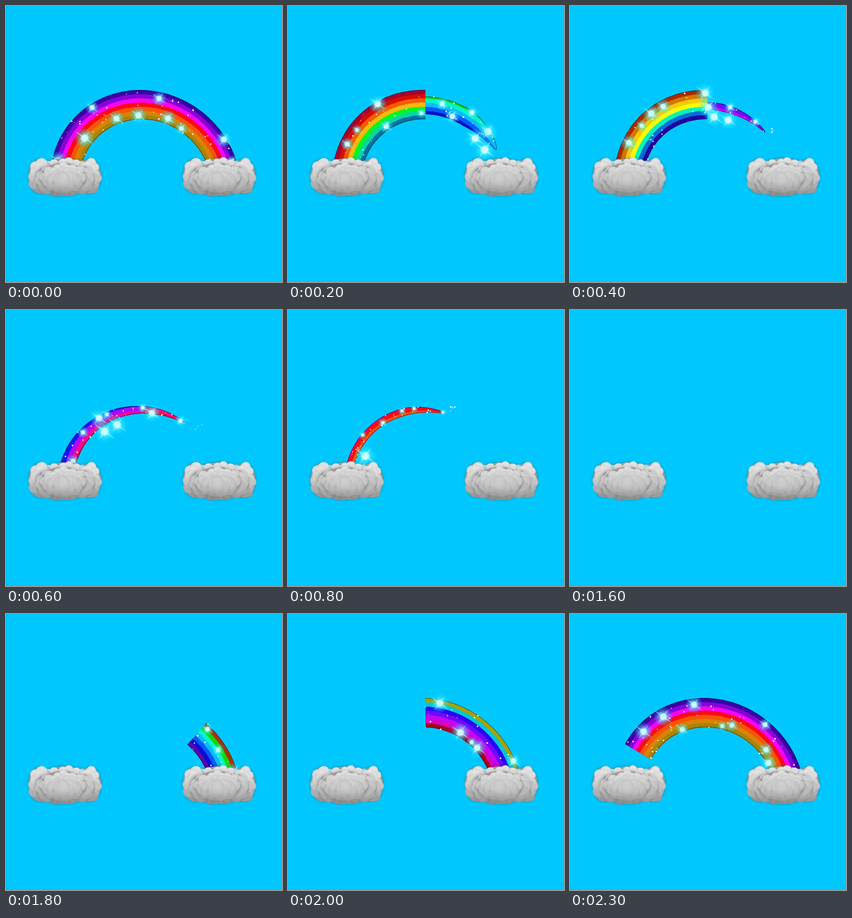
Write an HTML page with a canvas that moves like this. It is 480x480 px and loops after 2.4 s.

```html
<!DOCTYPE html>
<html lang="en">
<head>
<meta charset="utf-8">
<title>Rainbow</title>
<style>
html, body { margin: 0; width: 100%; height: 100%; overflow: hidden; background: #00c8ff; }
canvas { display: block; width: 480px; height: 480px; }
</style>
</head>
<body>
<canvas id="stage" width="480" height="480"></canvas>
<script>
const ctx = document.getElementById('stage').getContext('2d');
const STEP = 100, STEPS = 24, TAU = Math.PI * 2;
const CX = 240, CY = 312, OUTER = 166, FULL = 51, THIN = 13;
const SPLIT = 239, HORIZON = 264, LEAN = 0.06;
const lerp = (a, b, k) => a + (b - a) * k;
const clamp = v => Math.max(0, Math.min(1, v));

function seeded(seed) {
  let s = seed * 7919 + 17;
  return () => {
    s = (s + 0x6D2B79F5) | 0;
    let v = Math.imul(s ^ (s >>> 15), 1 | s);
    v = (v + Math.imul(v ^ (v >>> 7), 61 | v)) ^ v;
    return ((v ^ (v >>> 14)) >>> 0) / 4294967296;
  };
}

// Hues of the stripes from the outside in; both halves cycle from WARM through their own set
const WARM = [260, 277, 300, 357, 380, 396, 408];
const LEFT = [375, 392, 410, 420, 525, 570, 612];
const RIGHT = [420, 545, 610, 625, 648, 668, 712];

function stripe(hues, i, n) {
  const u = clamp((n % 4) / 3), k = u * u * (3 - 2 * u);
  const hue = n % 8 < 4 ? lerp(WARM[i], hues[i], k) : lerp(hues[i], WARM[i] + 360, k);
  const edge = (i - 3) / 3;
  return `hsl(${hue % 360},96%,${51 - 18 * edge * edge}%)`;
}

// The visible bow: angles in degrees from the right end, and each half's width at an angle
function bowAt(n) {
  if (n === 0 || n > 14) {
    const full = () => FULL;
    return { from: 12, to: 88 + 20.3 * ((n || STEPS) - 20), left: full, right: full };
  }
  const tip = Math.max(11 + 7.75 * n, 14.5 * n - 43);
  const taper = a => Math.pow(clamp((a - tip) / 30), 0.6);
  const shrink = (steps, rate) => Math.max(THIN, FULL - rate * Math.max(0, steps));
  const cut = shrink(n, 10), top = shrink(n - 4, 19), base = shrink(n - 4, 12);
  return {
    from: tip, to: 166,
    right: a => cut * taper(a),
    left: a => lerp(top, base, (a - 90) / 75) * taper(a)
  };
}

const widthAt = (bow, a) => (a < 88 ? bow.right : bow.left)(a);
const middle = w => 138.5 + (w - THIN) * 0.053;

function polar(a, r) {
  const t = a * Math.PI / 180;
  return [CX + r * Math.cos(t), CY - r * Math.sin(t)];
}
function place(a, r) {
  const [x, y] = polar(a, r);
  return [x + LEAN * (y - HORIZON), y];
}

function drawHalf(from, to, width, hues, n, x) {
  if (to <= from) return;
  const rim = side => Array.from({ length: 61 }, (_, i) => {
    const a = lerp(from, to, i / 60), w = width(a);
    return polar(a, middle(w) + side * w / 2);
  });
  const trace = points => {
    ctx.beginPath();
    points.forEach(p => ctx.lineTo(...p));
  };
  const outer = rim(1), inner = rim(-1);
  ctx.save();
  ctx.beginPath();
  ctx.rect(x, 0, SPLIT, 285);
  ctx.clip();
  ctx.transform(1, 0, LEAN, 1, -LEAN * HORIZON, 0);
  trace([...outer, ...inner.slice().reverse()]);
  ctx.clip();
  hues.forEach((_, i) => {
    ctx.fillStyle = stripe(hues, i, n);
    ctx.beginPath();
    ctx.arc(CX, CY, OUTER - i * FULL / hues.length, 0, TAU);
    ctx.fill();
  });
  ctx.strokeStyle = 'rgba(20,5,60,.5)';
  ctx.lineWidth = 2;
  for (const line of [outer, inner]) {
    trace(line);
    ctx.stroke();
  }
  ctx.restore();
}

function glint(x, y, size) {
  ctx.save();
  ctx.translate(x, y);
  const glow = ctx.createRadialGradient(0, 0, 0, 0, 0, size);
  glow.addColorStop(0, '#fff');
  glow.addColorStop(0.25, 'rgba(235,255,255,.95)');
  glow.addColorStop(0.45, 'rgba(80,245,255,.55)');
  glow.addColorStop(1, 'rgba(0,225,255,0)');
  ctx.fillStyle = glow;
  ctx.beginPath();
  ctx.arc(0, 0, size, 0, TAU);
  ctx.fill();
  ctx.rotate(0.62);
  ctx.fillStyle = 'rgba(170,255,255,.7)';
  ctx.beginPath();
  for (let i = 0; i < 8; i++) {
    const r = i % 2 ? size * 0.12 : size * (i % 4 ? 0.9 : 1.15), a = i * TAU / 8;
    ctx.lineTo(r * Math.cos(a), r * Math.sin(a));
  }
  ctx.fill();
  ctx.restore();
}

function drawSparkles(bow, n) {
  const rand = seeded(n + 3), span = bow.to - bow.from;
  const spot = (k, offset) => {
    const a = lerp(bow.from, bow.to, k), w = widthAt(bow, a);
    return place(a, middle(w) + offset * w);
  };
  const dust = ([x, y]) => {
    ctx.beginPath();
    ctx.arc(x, y, 0.6 + rand() * 0.9, 0, TAU);
    ctx.fill();
  };
  ctx.fillStyle = '#fff';
  for (let i = 0; i < span / 3.2; i++) dust(spot(rand(), (rand() - 0.5) * 1.05));

  const glints = Math.ceil(span / 17);
  for (let i = 0; i < glints; i++) {
    const edge = rand() < 0.6 ? 0.45 : -0.45;
    const big = widthAt(bow, lerp(bow.from, bow.to, 0.6)) > THIN ? 9 : 5;
    glint(...spot((i + rand()) / glints, edge * (0.4 + 0.6 * rand())), big + rand() * big);
  }
  // Loose light where the bow has just been trimmed away
  if (n > 1 && n < 9) {
    const a = 77 + 20 * (n - 4);
    for (const side of [-6, 6]) glint(...place(a + side, 120), 17 + rand() * 3);
  }
  if (n > 2 && n < 15) {
    ctx.fillStyle = '#fff';
    for (let i = 0; i < 4; i++) dust(place(bow.from - rand() * 12, 134 + rand() * 20));
  }
}

function ball(x, y, r, tone) {
  const grey = v => `rgb(${v},${v},${v})`;
  const g = ctx.createRadialGradient(x, y - r * 0.35, 0, x, y, r);
  g.addColorStop(0, grey(tone + 6));
  g.addColorStop(0.65, grey(tone));
  g.addColorStop(1, grey(tone - 9));
  ctx.fillStyle = g;
  ctx.beginPath();
  ctx.arc(x, y, r, 0, TAU);
  ctx.fill();
}

// A lobe is a heap of balls over a soft shadow, laid from its rim to its middle
function lobe(x, y, rx, ry, rand) {
  ctx.save();
  ctx.shadowColor = 'rgba(50,50,50,.45)';
  ctx.shadowBlur = 5;
  ctx.fillStyle = '#999';
  ctx.beginPath();
  ctx.ellipse(x, y, rx - 3, ry - 3, 0, 0, TAU);
  ctx.fill();
  ctx.restore();
  const count = Math.round(rx * ry / 32);
  for (let i = count; i > 0; i--) {
    const q = Math.sqrt((i - rand() * 0.3 * (count - i)) / count) || 0, a = i * 2.4;
    const r = 7 + rand() * 4;
    const dx = Math.cos(a) * q * (rx - r), dy = Math.sin(a) * q * (ry - r);
    const depth = clamp((y + dy + 30) / 60);
    ball(x + dx, y + dy, r, Math.round(234 - 92 * Math.pow(depth, 1.6) - 8 * q * q));
  }
}

function drawCloud(x, y) {
  const rand = seeded(5);
  ctx.save();
  ctx.translate(x, y);
  lobe(0, -16, 42, 20, rand);
  for (const side of [-1, 1]) lobe(side * 43, -2, 23, 33, rand);
  lobe(-3, 15, 44, 20, rand);
  for (const side of [-1, 1]) lobe(side * 31, 4, 23, 26, rand);
  lobe(-3, 1, 43, 29, rand);
  ctx.restore();
}

function draw(n) {
  ctx.fillStyle = '#00c8ff';
  ctx.fillRect(0, 0, 480, 480);
  const bow = bowAt(n);
  if (bow.to > bow.from) {
    // Both halves overrun the vertical split, which trims them
    drawHalf(bow.from, Math.min(bow.to, 95), bow.right, RIGHT, n, SPLIT);
    drawHalf(Math.max(bow.from, 85), bow.to, bow.left, LEFT, n, 0);
    drawSparkles(bow, n);
  }
  const rand = seeded(n + 60);
  drawCloud(102 + rand() * 0.8, 298);
  drawCloud(370.3 + rand() * 0.8, 298);
}

let shown = -1;
function tick() {
  const n = Math.floor(performance.now() / STEP) % STEPS;
  if (n !== shown) draw(shown = n);
  requestAnimationFrame(tick);
}
tick();
</script>
</body>
</html>
```
